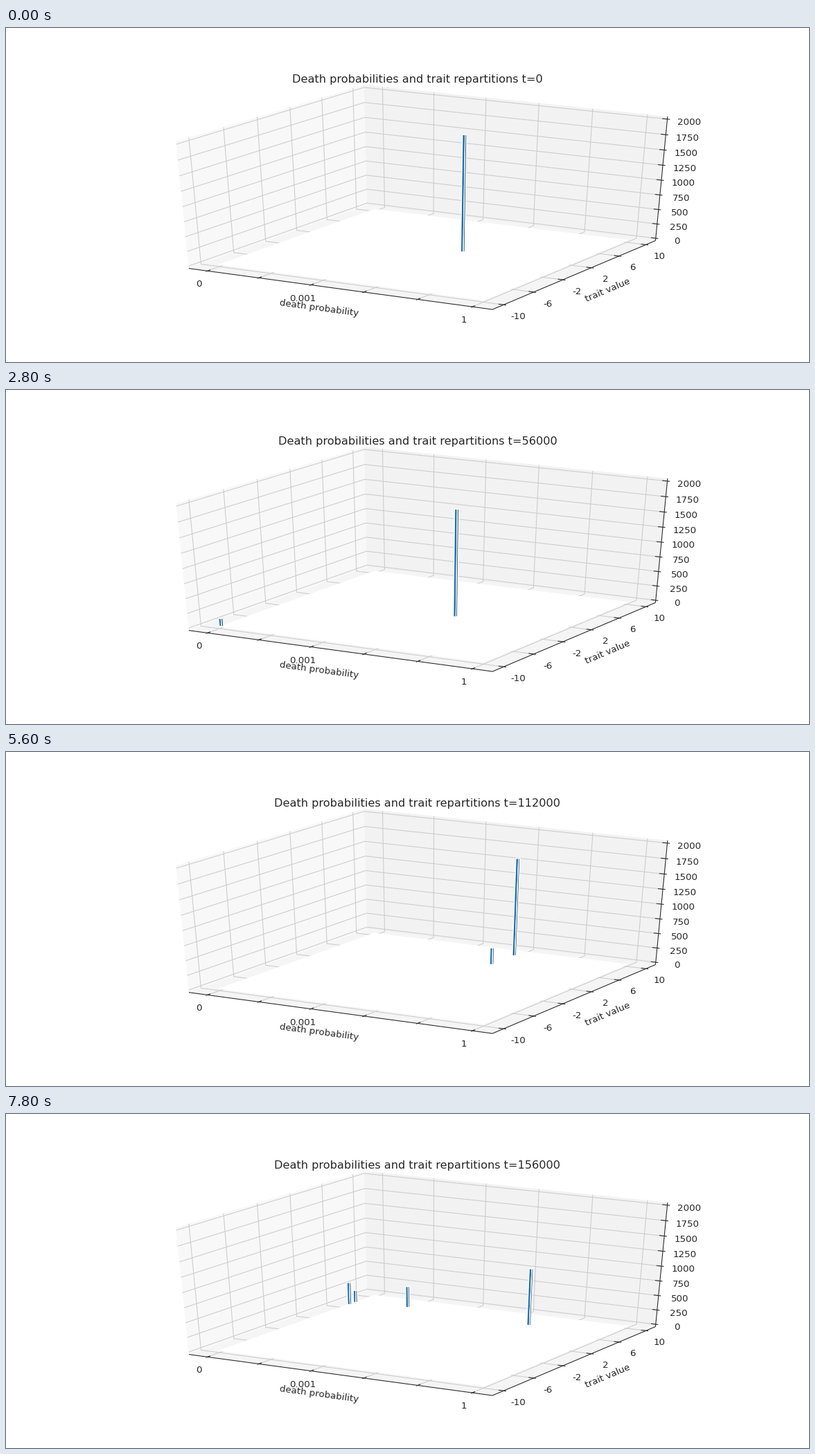
Recreate the animation shown at these times as a matplotlib script. Size 1159x483 px, loop 8000 ms.

```python
import numpy as np
import matplotlib.pyplot as plt
from matplotlib.animation import FuncAnimation
from matplotlib.collections import LineCollection, PolyCollection

W, H, DPI = 1159, 483, 100
SCALE = W / 1200                  # text and lines are laid out for 12 x 5 inches
FRAMES, STEP_MS, STEP_T = 40, 200, 4000
INK, GRID = "#262626", "#cccccc"
BLUE, SHADE = "#1c70ab", "#103c5a"

LO, HI = -1 / 48, 1 + 1 / 48      # pane limits in unit-cube coordinates
PER_POINT = 48 / (72 * (12 * 0.775 + 5 * 0.77)) / 12
TICK_PAD, NAME_PAD = 11.5 * PER_POINT, 25 * PER_POINT
TICK_IN, TICK_OUT = 0.2 / 12, 0.1 / 12

SIZE = 0.5                        # bar width and depth in data units
POPULATION, SPAN = 1950, 4
MAIN_BIN = 30
DRIFT = [(0, 28), (10, 3.5), (17, 42), (24, 48), (28, 46), (35, 44)]

# Side colonies: peak frame, death bin, trait bin, share of the population
COLONIES = [
    (17, 0, 0, 0.28), (17, 25, 42.5, 0.04),
    (24, 35, 37.5, 0.11), (28, 30, 38, 0.15),
    (35, 20, 42, 0.12), (35, 25, 43.5, 0.60), (35, 35, 41.5, 0.13),
    (39, 0, 41, 0.20), (39, 0, 43, 0.11), (39, 10, 44, 0.19),
    (39, 35, 42, 0.50),
]


def project(p):
    """Perspective view of unit-cube points, in stage pixels."""
    p = np.asarray(p, float) - 0.5
    elev, azim = np.radians(30), np.radians(-60)
    ce, se, ca, sa = np.cos(elev), np.sin(elev), np.cos(azim), np.sin(azim)
    depth = 10 - p @ [ce * ca, ce * sa, se]
    x = p @ [-sa, ca, 0] / depth
    y = p @ [-se * ca, -se * sa, ce] / depth
    px = W * (0.125 + 0.775 * (x + 0.095) / 0.185)
    py = H * (0.89 - 0.77 * (y + 0.095) / 0.185)
    return np.stack([px, py], axis=-1)


def data(x, y, z=0):
    return ((x + 2.5) / 55, (y + 2.5) / 55, z / 2000)


fig = plt.figure(figsize=(W / DPI, H / DPI), dpi=DPI, facecolor="white")
ax = fig.add_axes([0, 0, 1, 1])
ax.set_xlim(0, W)
ax.set_ylim(H, 0)
ax.axis("off")


def quad(points, color, z, edge="none"):
    ax.add_collection(PolyCollection([project(points)], facecolors=color,
                                     edgecolors=edge, linewidths=SCALE,
                                     zorder=z), autolim=False)


def lines(paths, color, z):
    ax.add_collection(LineCollection([project(p) for p in paths], colors=color,
                                     linewidths=0.8 * SCALE, zorder=z),
                      autolim=False)


def write(xy, text, size=10, **kw):
    return ax.text(*xy, text, size=size * SCALE, color=INK, ha="center",
                   family="DejaVu Sans", zorder=9, **kw)


def axis_name(p, text, start, end):
    """Centre a name at p, turned along the edge from start to end."""
    dx, dy = project(end) - project(start)
    write(project(p), text, va="center", rotation_mode="anchor",
          rotation=np.degrees(np.arctan2(-dy, dx)))


# Panes
quad([(LO, LO, LO), (LO, HI, LO), (LO, HI, HI), (LO, LO, HI)], "#f8f8f8", 1)
quad([(LO, HI, LO), (HI, HI, LO), (HI, HI, HI), (LO, HI, HI)], "#f2f2f2", 1)
quad([(LO, LO, LO), (HI, LO, LO), (HI, HI, LO), (LO, HI, LO)], "#f5f5f5", 1)

# Grid, ticks and axis lines
ticks = (np.arange(0, 51, 10) + 2.5) / 55
levels = np.linspace(0, 1, 9)
lines([[(t, LO, LO), (t, HI, LO), (t, HI, HI)] for t in ticks], GRID, 2)
lines([[(HI, t, LO), (LO, t, LO), (LO, t, HI)] for t in ticks], GRID, 2)
lines([[(LO, LO, t), (LO, HI, t), (HI, HI, t)] for t in levels], GRID, 2)
lines([[(t, LO + TICK_IN, LO), (t, LO - TICK_OUT, LO)] for t in ticks], INK, 5)
lines([[(HI - TICK_IN, t, LO), (HI + TICK_OUT, t, LO)] for t in ticks], INK, 5)
lines([[(HI - TICK_IN, HI, t), (HI + TICK_OUT, HI, t)] for t in levels], INK, 5)
lines([[(LO, LO, LO), (HI, LO, LO), (HI, HI, LO)],
       [(HI, HI, LO), (HI, HI, HI)]], INK, 5)

# Empty bins hide the floor
quad([data(0, 0), data(50, 0), data(50, 50), data(0, 50)], "white", 3, "white")

# Labels
near, far = LO - TICK_PAD, HI + TICK_PAD
for t, text in zip(ticks, ["0", "", "0.001", "", "", "1"]):
    write(project((t, near, near)), text, va="top")
for t, value in zip(ticks, range(-10, 11, 4)):
    write(project((far, t, near)), str(value), va="top")
for t in levels:
    write(project((far, far, t)), f"{2000 * t:.0f}", va="top")
near, far = LO - NAME_PAD, HI + NAME_PAD
axis_name((0.5, near, near), "death probability", (LO, LO, LO), (HI, LO, LO))
axis_name((far, 0.5, near), "trait value", (HI, LO, LO), (HI, HI, LO))
title = write((0.5125 * W, 79.5), "", size=12, va="baseline")

bars = PolyCollection([], edgecolors="white", linewidths=SCALE, zorder=6)
ax.add_collection(bars, autolim=False)


def population(i):
    """Side colonies swell and fade; the main one drifts and holds the rest."""
    sides = [(x, y, share * (1 - abs(i - peak) / SPAN))
             for peak, x, y, share in COLONIES if abs(i - peak) < SPAN]
    trait = np.round(2 * np.interp(i, *zip(*DRIFT))) / 2
    rest = 1 - sum(share for _, _, share in sides)
    groups = sides + [(MAIN_BIN, trait, rest)]
    return [(x, y, POPULATION * s) for x, y, s in groups if s > 0.015]


def faces(x, y, h):
    x2, y2 = x + SIZE, y + SIZE
    front = [data(x, y), data(x2, y), data(x2, y, h), data(x, y, h)]
    side = [data(x2, y), data(x2, y2), data(x2, y2, h), data(x2, y, h)]
    return [project(front), project(side)]


def draw(i):
    title.set_text(f"Death probabilities and trait repartitions t={i * STEP_T}")
    back_to_front = sorted(population(i), key=lambda b: 0.433 * b[0] - 0.75 * b[1])
    bars.set_verts([f for b in back_to_front for f in faces(*b)])
    bars.set_facecolors([BLUE, SHADE] * len(back_to_front))
    return title, bars


anim = FuncAnimation(fig, draw, frames=FRAMES, interval=STEP_MS,
                     init_func=lambda: draw(0), repeat=True, repeat_delay=0,
                     blit=False)
plt.show()
```
